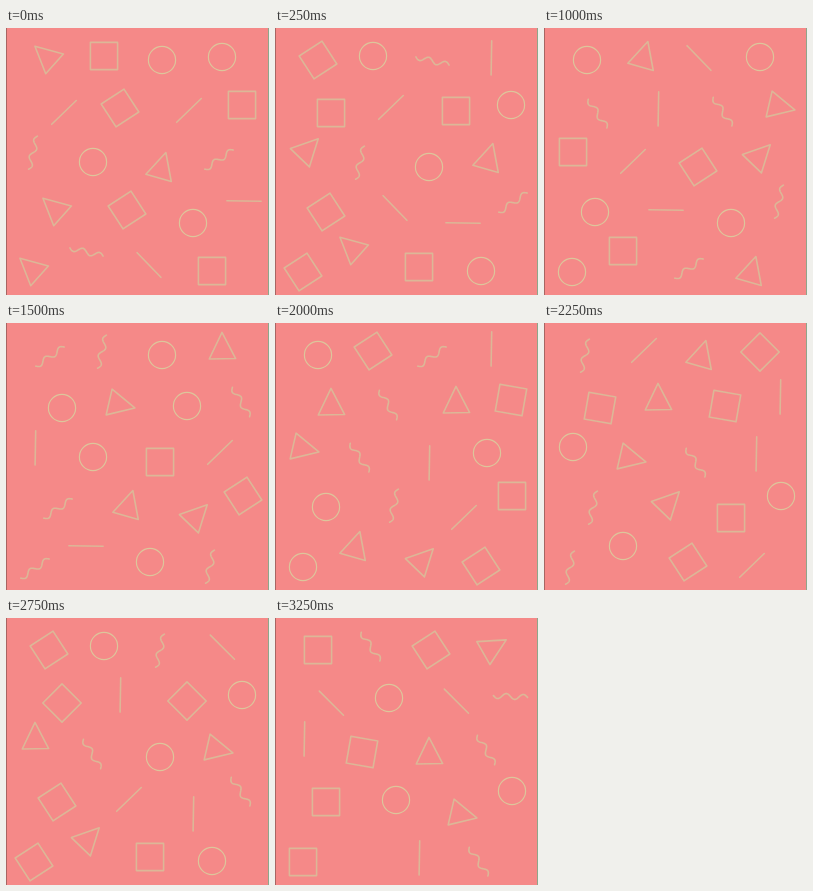
Animation of 263 by 267 pixels, one loop 3500 ms. Source, as an HTML page with a canvas:

```html
<!DOCTYPE html>
<html lang="en">
<head>
<meta charset="utf-8">
<title>Shape shuffle</title>
<style>
  html, body { margin: 0; width: 100%; height: 100%; overflow: hidden; background: #f58988; }
  canvas { display: block; }
</style>
</head>
<body>
<canvas id="stage" width="263" height="267"></canvas>
<script>
const W = 263, H = 267, STEP = 250, STEPS = 14;
const SIDE = 27.2, LENGTH = 34.2, RIPPLE = 2.7;
const ctx = document.getElementById('stage').getContext('2d');

// Outlines, drawn around the origin and pointing right.
const outlines = {
  circle() {
    ctx.arc(0, 0, SIDE / 2, 0, Math.PI * 2);
  },
  square() {
    ctx.rect(-SIDE / 2, -SIDE / 2, SIDE, SIDE);
  },
  triangle() {
    ctx.moveTo(17.6, 0);
    ctx.lineTo(-8.8, 13.2);
    ctx.lineTo(-8.8, -13.2);
    ctx.closePath();
  },
  line() {
    ctx.moveTo(-LENGTH / 2, 0);
    ctx.lineTo(LENGTH / 2, 0);
  },
  wave() {
    for (let u = 0; u <= 1; u += 1 / 64) {
      ctx.lineTo((u - .5) * LENGTH, RIPPLE * Math.sin(u * Math.PI * 4));
    }
  }
};

// Shape, angle in degrees, shift from the slot. Each slot walks along this
// chain, one entry per step.
const FIRST = -2;
const chain = [
  ['circle'], ['wave', 14, 1.5, 1],
  ['triangle', -138, -1, -2], ['square', -33],
  ['line', 46, -1, -2], ['square'],
  ['circle'], ['line', 1, 1, 0],
  ['wave', -34, 1, 1.6], ['triangle', -74, 1, 2.4],
  ['circle'], ['wave', 105, -2, .7],
  ['triangle', -46, 2, -.6], ['square', -33],
  ['line', -44, 2, -.6], ['square'],
  ['circle'], ['line', 91, .4, .8],
  ['wave', 57, -2.4, .6], ['triangle', 13, -2.3, 1],
  ['circle'], ['wave', 60, -1, 2],
  ['triangle', -91, .3, -2], ['square', 10],
  ['line', 91, .4, -3], ['square', 45],
  ['circle'], ['line', 45, .4, .2],
  ['wave', 3, -.5, 1.5], ['triangle', -30, 0, 1.7]
];

// x, y, starting place in the chain, optional last step
const slots = [
  [43, 32, 0], [98, 28, 3], [156, 32, -2], [216, 29, 14],
  [56, 85, 12], [114, 80, 11], [181, 83, 12], [236, 77, 13],
  [29, 124, 9], [87, 134, 8], [154, 139, 7], [212, 130, 6],
  [51, 184, 0], [121, 182, 1], [187, 195, 4], [237, 173, 5],
  [28, 244, 0], [79, 223, -1, 12], [144, 239, 2], [206, 243, 3]
];

function drawShape(x, y, [kind, angle = 0, dx = 0, dy = 0]) {
  const round = kind === 'circle';
  ctx.save();
  ctx.translate(x + dx, y + dy);
  ctx.rotate(angle * Math.PI / 180);
  ctx.beginPath();
  outlines[kind]();
  ctx.strokeStyle = round ? '#ddc59b' : '#dcb797';
  ctx.lineWidth = round ? 1.2 : 1.6;
  ctx.stroke();
  ctx.restore();
}

function fill(color, x, w) {
  ctx.fillStyle = color;
  ctx.fillRect(x, 0, w, H);
}

function draw(step) {
  fill('#f58988', 0, W);
  fill('#a86562', 0, 1);
  fill('#8fa58a', W - 1, 1);
  for (const [x, y, place, last = STEPS] of slots) {
    if (step <= last) drawShape(x, y, chain[step + place - FIRST]);
  }
}

ctx.lineCap = ctx.lineJoin = 'round';
const start = performance.now();
function tick() {
  draw(Math.floor((performance.now() - start) / STEP) % STEPS);
  requestAnimationFrame(tick);
}
tick();
</script>
</body>
</html>
```
